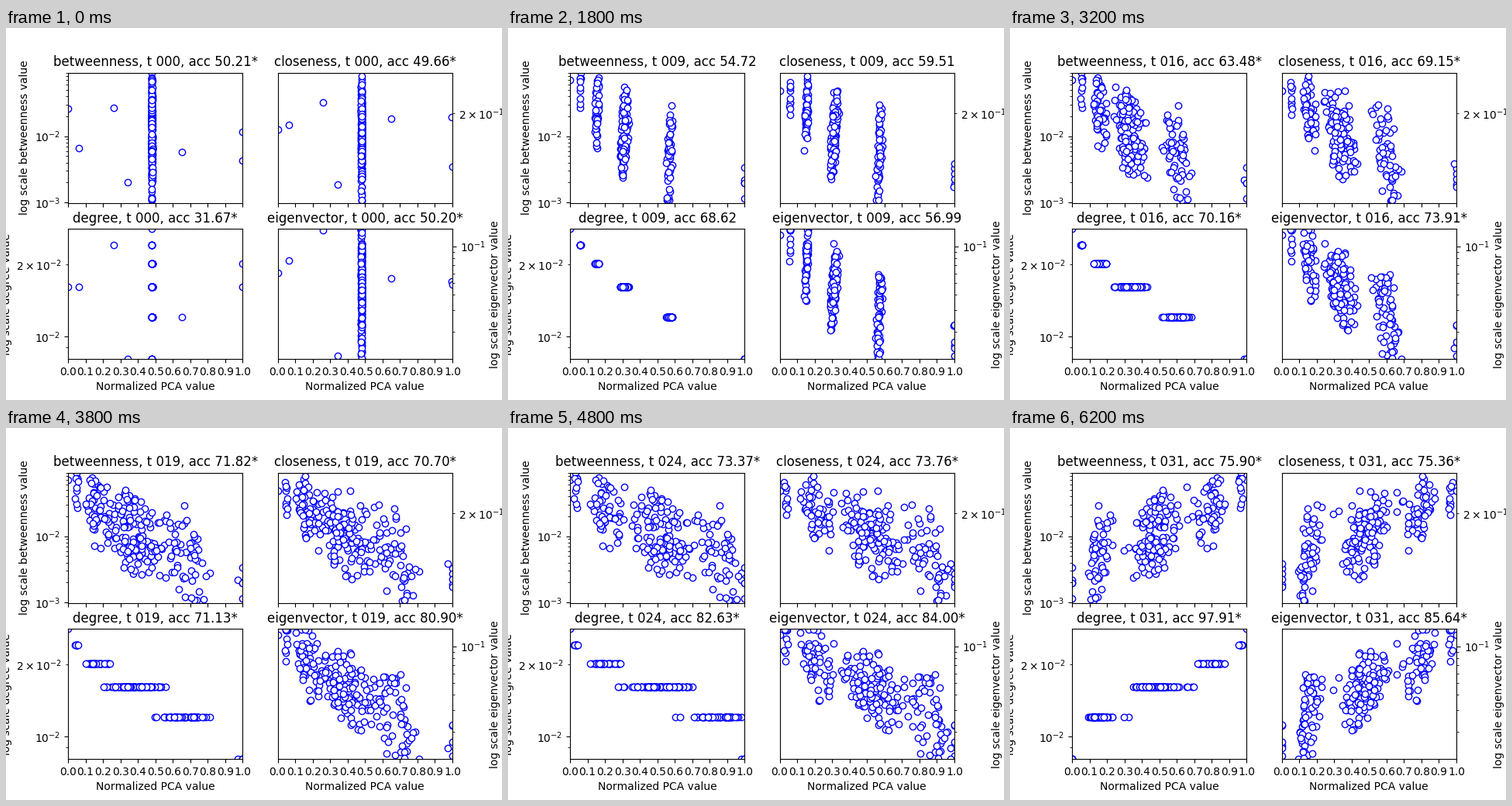
Animation of 640x480 px, one loop 6400 ms. Source, as a matplotlib script:

```python
import numpy as np
import matplotlib.pyplot as plt
from matplotlib.animation import FuncAnimation

plt.rcParams["text.kerning_factor"] = 6

STEPS = 32
FLIP_STEP = 26  # the principal axis changes sign here
ACC_STEPS = [0, 6, 12, 19, 24, 28, 31]

# name: lower limit, upper limit, level at degree 3, growth per doubled degree,
# weight of shared centrality, first step without a star, accuracy at ACC_STEPS
PANELS = {
    "betweenness": (0.00099, 0.0905, 0.34, 0.53, 0.6, 3,
                    [50.21, 57.06, 52.37, 71.82, 73.37, 74.88, 75.90]),
    "closeness": (0.165, 0.2183, 0.38, 0.40, 0.75, 3,
                  [49.66, 51.94, 67.08, 70.70, 73.76, 74.99, 75.36]),
    "degree": (2 / 249, 7 / 249, None, None, None, 7,
               [31.67, 68.38, 68.86, 71.13, 82.63, 94.21, 97.91]),
    "eigenvector": (0.01195, 0.1385, 0.36, 0.52, 0.85, 3,
                    [50.20, 49.40, 64.58, 80.90, 84.00, 85.26, 85.64]),
}

rng = np.random.default_rng(11)

# Nodes set apart at the start come first
apart_x = [0, 0.063, 0.26, 0.343, 0.65, 0.997, 1]
apart_degree = [4, 4, 6, 2, 3, 5, 4]
others = rng.permutation(np.repeat([2, 3, 4, 5, 6, 7], [5, 59, 118, 51, 9, 1]))
degree = np.concatenate([apart_degree, others])
count = len(degree)


def spread():
    return rng.uniform(-1.73, 1.73, count)


core = spread()


def mixed(weight):
    return weight * core + np.sqrt(1 - weight ** 2) * spread()


def smooth(begin, end, value):
    part = np.clip((value - begin) / (end - begin), 0, 1)
    return part * part * (3 - 2 * part)


def node_values(low, high, base, growth, weight):
    if base is None:
        return degree / 249
    sd = np.minimum(0.19, 0.68 / degree)
    level = np.abs(base + growth * np.log2(degree / 3) + sd * mixed(weight))
    level = 1 - np.abs(1 - level)
    return low * (high / low) ** level


start_x = 0.48 + 0.001 * spread()
start_x[:len(apart_x)] = apart_x
early_rank = 0.5 + 0.2 * mixed(0.7)
late_rank = 0.5 - 0.205 * mixed(0.6)

# Cluster centres: geometric gaps at first, an S-curve over degree later
rank = (7 - degree) / 5
early_centre = (1.65 ** (7 - degree) - 1) / (1.65 ** 5 - 1)
late_centre = smooth(0, 1, rank ** 1.35)
bump = np.exp(-((degree - 3.7) / 1.5) ** 2)


def node_x(step):
    move = np.clip((step - 12) / 12, 0, 1) ** 2
    centre = early_centre + (late_centre - early_centre) * move
    order = early_rank + (late_rank - early_rank) * smooth(8, 18, step)
    width = bump * (0.06 + 0.5 * smooth(10, 24, step))
    power = 1 - rank * smooth(16, 30, step)
    x = np.clip(centre + width * (order ** power - 1 / (1 + power)), 0, 1)
    settle = 1 - (1 - min(step / 6, 1)) ** 2
    x = start_x + (x - start_x) * settle
    return 1 - x if step >= FLIP_STEP else x


fig, axes = plt.subplots(2, 2, sharex=True, figsize=(6.4, 4.8), dpi=100)
views = []
for i, (ax, (name, panel)) in enumerate(zip(axes.flat, PANELS.items())):
    *shape, pause, keys = panel
    ax.set_yscale("log")
    ax.set_ylim(shape[:2])
    ax.set_xlim(0, 1)
    ax.set_xticks(np.arange(11) / 10)
    ax.set_ylabel(f"log scale {name} value")
    if i % 2:
        ax.yaxis.tick_right()
        ax.yaxis.set_label_position("right")
    if i >= 2:
        ax.set_xlabel("Normalized PCA value")
    if name == "closeness":
        ax.set_yticks([])
        ax.set_yticks([0.2], [r"$\mathdefault{2\times10^{-1}}$"], minor=True)
    dots, = ax.plot(start_x, node_values(*shape), "o", mec="blue", mfc="white")
    views.append((name, dots, ax.set_title(""), pause, keys))


def draw(step):
    x = node_x(step)
    for name, dots, title, pause, keys in views:
        dots.set_xdata(x)
        accuracy = np.interp(step, ACC_STEPS, keys)
        star = "*" if step < pause or step > 14 else ""
        title.set_text(f"{name}, t {step:03d}, acc {accuracy:.2f}{star}")
    return []


anim = FuncAnimation(fig, draw, frames=STEPS, interval=200, repeat=True,
                     repeat_delay=0, blit=False)
plt.show()
```
